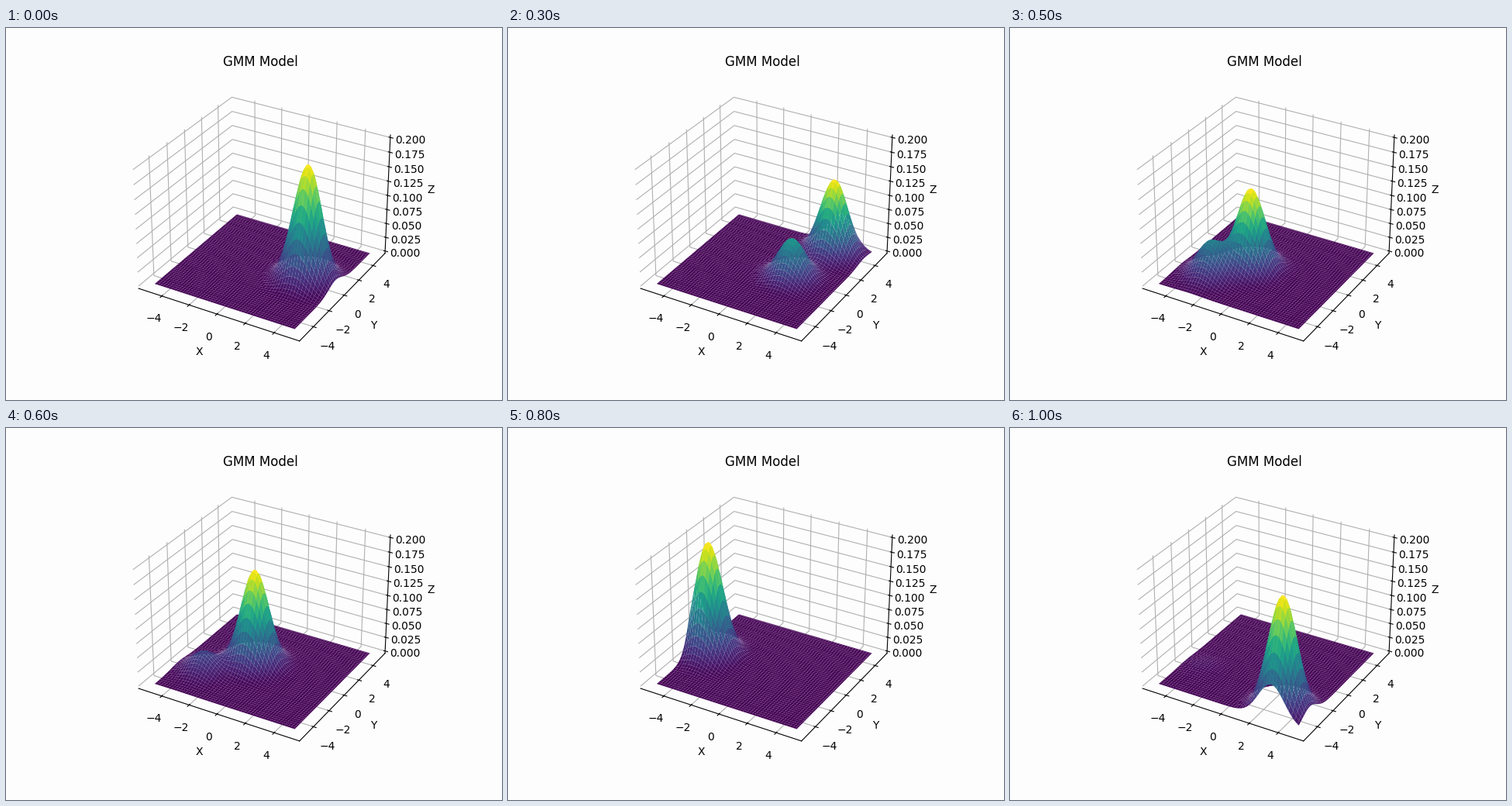
Recreate the animation shown at these times as a matplotlib script. Size 640 px wide and 480 px high, loop 1100 ms.

```python
import numpy as np
import matplotlib.pyplot as plt
from matplotlib.animation import FuncAnimation

PAPER = "#fdfdfd"
STEPS = 11
VAR = 0.8      # shared isotropic variance

# Key points the two components travel between
MAIN = [  # step, x, y, weight
    (0, 2.95, 0.2, 0.99),
    (1, 2.75, 3.85, 0.43),
    (3, 2.75, 3.85, 0.65),
    (4, 0.5, 1.6, 0.98),
    (5, -0.93, -0.5, 0.70),
    (7, -0.62, 0.9, 0.955),
    (8, -4.0, -0.27, 0.985),
    (10, 3.1, -3.65, 0.97),
]
SIDE = [  # step, x, y
    (1, 2.07, 0.64),
    (3, 1.95, -0.2),
    (5, -2.7, -2.5),
    (7, -3.6, -1.9),
]

grid = np.linspace(-5, 5, 100)
X, Y = np.meshgrid(grid, grid)


def along(keys, step):
    times, *tracks = zip(*keys)
    return [np.interp(step, times, track) for track in tracks]


def gauss(x, y):
    r2 = (X - x) ** 2 + (Y - y) ** 2
    return np.exp(-r2 / (2 * VAR)) / (2 * np.pi * VAR)


def density(step):
    x, y, weight = along(MAIN, step)
    flash = 0.19 * max(0, 1 - abs(step - 1))   # short-lived third bump
    return (weight * gauss(x, y)
            + (1 - weight - flash) * gauss(*along(SIDE, step))
            + flash * gauss(-0.75, 2.66))


def padded(lo, hi):
    pad = (hi - lo) / 48
    return lo - pad, hi + pad


fig = plt.figure(figsize=(6.4, 4.8), dpi=100, facecolor=PAPER)
ax = fig.add_subplot(projection="3d", facecolor=PAPER)
ax.set_title("GMM Model")
ax.set(xlabel="X", ylabel="Y", zlabel="Z")
for axis in (ax.xaxis, ax.yaxis, ax.zaxis):
    axis.set_pane_color(PAPER)
ax.set_xlim(*padded(-5.5, 5.5))
ax.set_ylim(*padded(-5.5, 5.5))
ax.set_zlim(*padded(0, 0.2))


def draw(step):
    for old in list(ax.collections):
        old.remove()
    return [ax.plot_surface(X, Y, density(step), cmap="viridis")]


anim = FuncAnimation(fig, draw, frames=STEPS, interval=100,
                     repeat=True, repeat_delay=0, blit=False)
plt.show()
```
